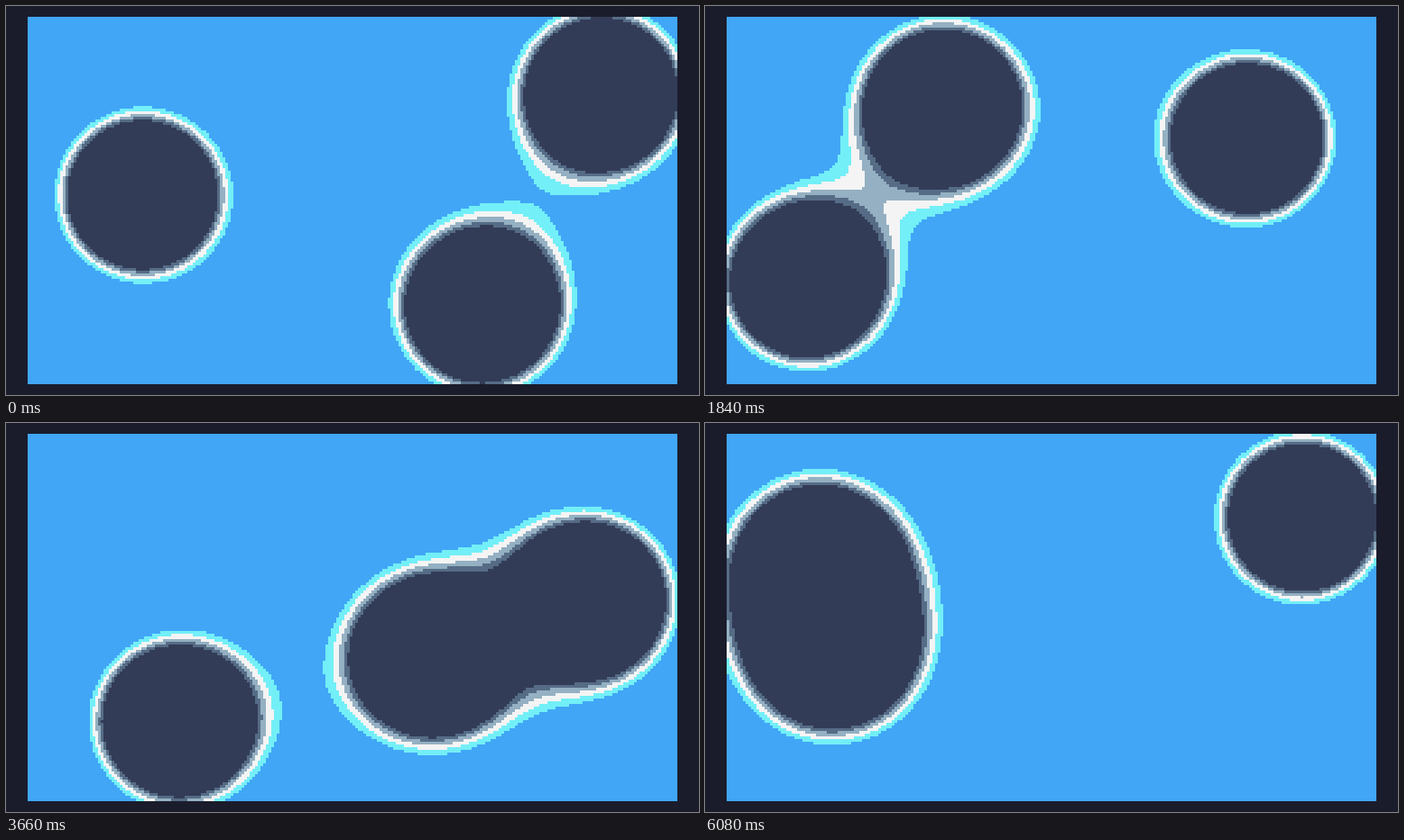
An HTML page with a canvas that plays this animation: 768 by 432 pixels, repeating every 6100 ms.

```html
<!DOCTYPE html>
<html lang="en">
<head>
<meta charset="utf-8">
<title>Metaballs</title>
<style>
  html, body { margin: 0; width: 100%; height: 100%; overflow: hidden; background: #1a1c2c; }
  canvas { position: absolute; left: 24px; top: 12px; width: 720px; height: 408px; image-rendering: pixelated; }
</style>
</head>
<body>
<canvas id="screen" width="240" height="136"></canvas>
<script>
const W = 240, H = 136, LOOP = 6100, STEP = 20, STRENGTH = 10740;
const ctx = document.getElementById('screen').getContext('2d');
const image = ctx.createImageData(W, H);
const pixels = new Uint32Array(image.data.buffer);

// Colours for field levels 10 to 15, packed as ABGR
const palette = [0x41a6f6, 0x73eff7, 0xf4f4f4, 0x94b0c2, 0x566c86, 0x333c57].map(c =>
  (0xff000000 | (c & 255) << 16 | (c & 0xff00) | c >> 16) >>> 0);

function ballAt(i, s) {
  return {
    x: 120 + 93 * Math.cos(s * 1.656 - 1.03 + 3.594 * i),
    y: 68 + 40 * Math.cos(s * 1.347 + 0.157 + 1.466 * i)
  };
}

function draw(ms) {
  const balls = [0, 1, 2].map(i => ballAt(i, ms / 1000));
  for (let y = 0, p = 0; y < H; y++) {
    for (let x = 0; x < W; x++, p++) {
      let field = 0;
      for (const b of balls) {
        const dx = x + 0.5 - b.x, dy = y + 0.5 - b.y;
        field += STRENGTH / (dx * dx + dy * dy + 1e-6);
      }
      pixels[p] = palette[Math.floor(Math.max(10, Math.min(15, field))) - 10];
    }
  }
  ctx.putImageData(image, 0, 0);
}

const start = performance.now();
function tick() {
  const ms = (performance.now() - start) % LOOP;
  draw(Math.floor(ms / STEP) * STEP);
  requestAnimationFrame(tick);
}
tick();
</script>
</body>
</html>
```
